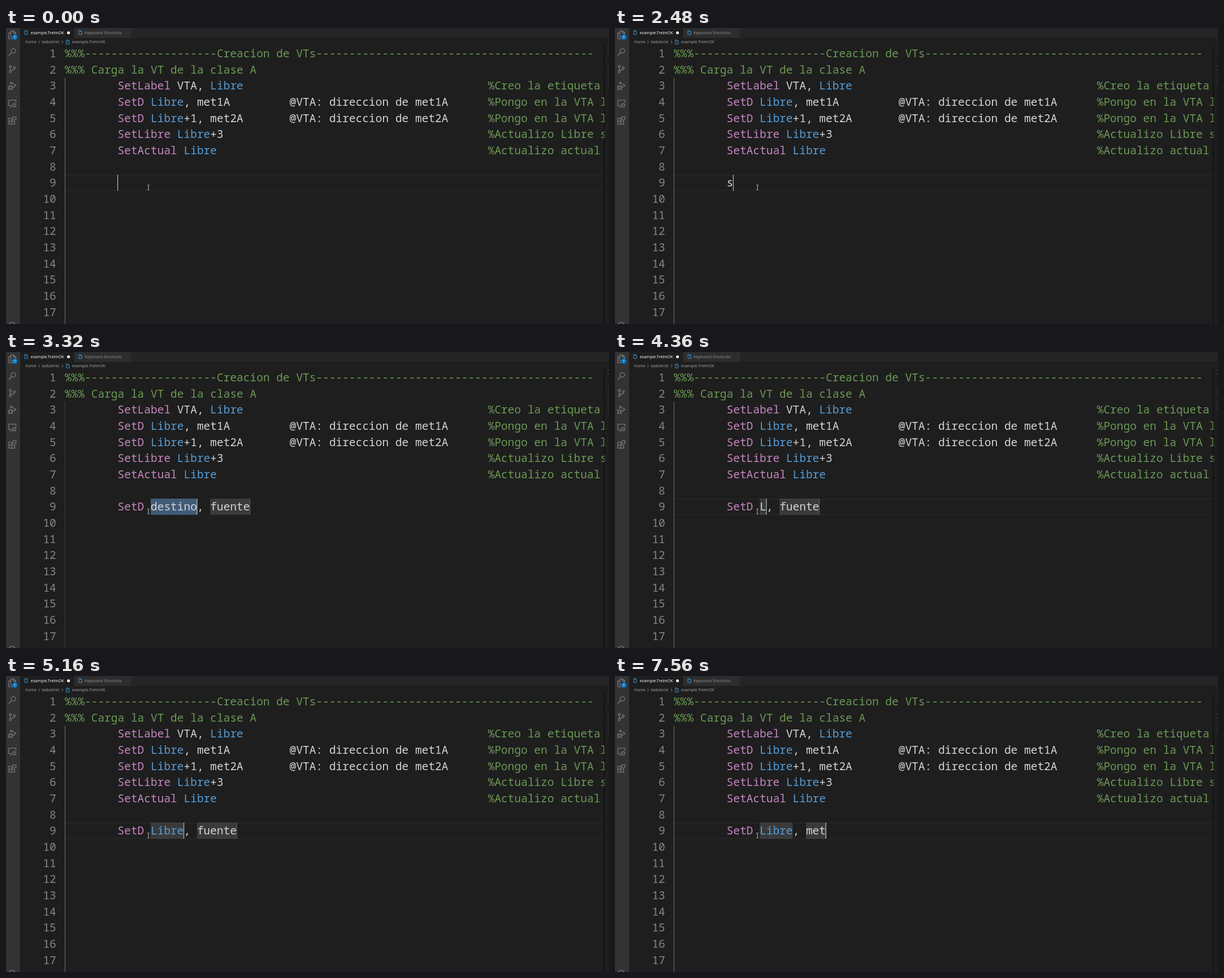
These frames come from a looping animation (1067 by 525 pixels, 8000 ms). An HTML page with a canvas:

```html
<!DOCTYPE html>
<html lang="es">
<head>
<meta charset="utf-8">
<title>Editor</title>
<style>
  html, body { margin: 0; width: 100%; height: 100%; overflow: hidden; background: #1e1e1e; }
  canvas { display: block; width: 1067px; height: 525px; }
</style>
</head>
<body>
<canvas id="stage"></canvas>
<script>
const W = 1067, H = 525, LOOP = 8000;
const LEFT = 103.9, TOP = 30.7, CHAR = 11.7, ROW = 28.67, BASE = 21.4;
const CODE = '"Noto Sans Mono", monospace';
const UI = '"Open Sans", "Noto Sans", sans-serif';
const C = {
  bg: '#1e1e1e', text: '#d4d4d4', call: '#c586c0', word: '#569cd6',
  note: '#6a9955', num: '#858585', caret: '#c8c8c8', icon: '#858585',
  file: '#3fa0e8', panel: '#252526', edge: '#454545'
};

const canvas = document.getElementById('stage');
const ctx = canvas.getContext('2d');
const dpr = window.devicePixelRatio || 1;
canvas.width = W * dpr;
canvas.height = H * dpr;
ctx.scale(dpr, dpr);

// Static code: line -> [column, colour, text] runs
const rows = {
  1: [[0, C.note, '%%%' + '-'.repeat(20) + 'Creacion de VTs' + '-'.repeat(42)]],
  2: [[0, C.note, '%%% Carga la VT de la clase A']],
  3: [[8, C.call, 'SetLabel'], [17, C.text, 'VTA,'], [22, C.word, 'Libre'],
      [64, C.note, '%Creo la etiqueta']],
  4: [[8, C.call, 'SetD'], [13, C.word, 'Libre'], [18, C.text, ', met1A'],
      [34, C.text, '@VTA: direccion de met1A'], [64, C.note, '%Pongo en la VTA l']],
  5: [[8, C.call, 'SetD'], [13, C.word, 'Libre'], [18, C.text, '+1, met2A'],
      [34, C.text, '@VTA: direccion de met2A'], [64, C.note, '%Pongo en la VTA l']],
  6: [[8, C.call, 'SetLibre'], [17, C.word, 'Libre'], [22, C.text, '+3'],
      [64, C.note, '%Actualizo Libre s']],
  7: [[8, C.call, 'SetActual'], [18, C.word, 'Libre'], [64, C.note, '%Actualizo actual']]
};

// Timelines: [start ms, value]
const caretOn = [[0, true], [480, false], [1000, true], [1440, false], [1920, true],
  [3800, false], [4240, true], [5600, false], [6160, true], [6720, false], [7160, true]];
const prefix = [[0, ''], [2480, 's'], [2760, 'sd']];
const target = [[3200, 'destino'], [4240, 'L'], [4520, 'Li'], [4760, 'Lib'], [5040, 'Libr'], [5120, 'Libre']];
const origin = [[3200, 'fuente'], [7320, 'm'], [7440, 'me'], [7560, 'met']];
const selected = [[0, ''], [3200, 'target'], [4240, ''], [6160, 'origin'], [7320, '']];
const dimmed = [[0, false], [3320, true], [4360, false], [6200, true], [7440, false]];

function valueAt(track, t) {
  let value = track[0][1];
  for (const [start, v] of track) if (t >= start) value = v;
  return value;
}

const colX = col => LEFT + col * CHAR;
const rowY = line => TOP + (line - 1) * ROW;

function rect(x, y, w, h, color) {
  ctx.fillStyle = color;
  ctx.fillRect(x, y, w, h);
}

function label(text, x, y, color, font, align = 'left') {
  ctx.font = font;
  ctx.fillStyle = color;
  ctx.textAlign = align;
  ctx.fillText(text, x, y);
}

const code = (text, x, y, color, weight = '') => label(text, x, y, color, `${weight} 19.5px ${CODE}`);
const ui = (text, x, y, color) => label(text, x, y, color, `7.2px ${UI}`);
const run = (line, col, color, text) => code(text, colX(col), rowY(line) + BASE, color);

function stroke(path, color, width = 1) {
  ctx.strokeStyle = color;
  ctx.lineWidth = width;
  ctx.stroke(new Path2D(path));
}

function frame(x, y, w, h, fill) {
  rect(x, y, w, h, fill);
  ctx.strokeStyle = C.edge;
  ctx.lineWidth = 0.8;
  ctx.strokeRect(x + 0.5, y + 0.5, w - 1, h - 1);
}

function dot(x, y, r, color) {
  ctx.fillStyle = color;
  ctx.beginPath();
  ctx.arc(x, y, r, 0, Math.PI * 2);
  ctx.fill();
}

function fileIcon(x, y) {
  stroke(`M${x} ${y}h3l2.2 2.2v4.8h-5.2zM${x + 3} ${y}v2.2h2.2`, C.file, 0.9);
}

function activityBar() {
  rect(0, 0, 25, H, '#333333');
  const icons = [
    'M8.5 5h5l3.5 3.5v7h-8.500zM13 5v4h4M8 8.500H5v10.500h8v-3',
    'M17 40.500a4 4 0 1 1-8 0a4 4 0 1 1 8 0M10.200 43.500L5 49',
    'M9.500 68a1.800 1.800 0 1 1-3.600 0a1.800 1.800 0 1 1 3.600 0M9.500 77.500a1.800 1.800 0 1 1-3.600 0a1.800 1.800 0 1 1 3.600 0M16.500 70.500a1.800 1.800 0 1 1-3.600 0a1.800 1.800 0 1 1 3.600 0M7.700 69.800v6M14.700 72.300q0 2.500-3 2.500h-2q-2 0-2 1',
    'M8.500 101v-5l9 6-6 4.200M10.500 106a2.500 3 0 1 1-5 0a2.500 3 0 1 1 5 0M4 102.500l2 1.500M4 106h1.500M4 109.500l2-1.500M12 102.500l-2 1.500M12 106h-1.500M12 109.500l-2-1.500',
    'M10 137.500H5v-9.500h12.500v4.500M7 140h3.500M17.500 137a3 3 0 1 1-6 0a3 3 0 1 1 6 0M13.500 137h2',
    'M5 160h5.200v10.500H5zM5 165.300h10.400v5.200H5zM12.300 157.500h5.200v5.200h-5.200z',
    'M17 528a6 6 0 1 1-12 0a6 6 0 1 1 12 0'
  ];
  for (const path of icons) stroke(path, C.icon, 1.1);
  dot(15.6, 16.2, 4.7, '#007acc');
  label('1', 15.6, 18.3, '#ffffff', `600 5.5px ${UI}`, 'center');
}

function tabs() {
  rect(25, 0, W - 25, 17.6, C.panel);
  rect(25, 0, 95.5, 17.6, C.bg);
  rect(121, 0, 100.5, 17.6, '#2d2d2d');
  fileIcon(33, 4.5);
  ui('example.TrelmOK', 43.8, 10.9, '#ffffff');
  dot(110.6, 8.4, 2.5, '#ffffff');
  fileIcon(129, 4.5);
  ui('Keyboard Shortcuts', 139, 10.9, '#929292');

  ui('home', 34.3, 27.4, '#a9a9a9');
  stroke('M57.300 22.500l2.300 2.400l-2.300 2.400M98.800 22.500l2.300 2.400l-2.300 2.400', '#a0a0a0', 0.8);
  ui('tadulerisi', 63.4, 27.4, '#a9a9a9');
  fileIcon(106.7, 21.3);
  ui('example.TrelmOK', 117, 27.4, '#a9a9a9');
}

function minimap() {
  const shade = ctx.createLinearGradient(1056, 0, 1060, 0);
  shade.addColorStop(0, 'rgba(0,0,0,0)');
  shade.addColorStop(1, 'rgba(0,0,0,.45)');
  rect(1056, 31, 4, H - 31, shade);
  rect(1060, 31, 7, H - 31, C.bg);
  for (const y of [31.5, 39, 67.5, 73.5, 87.5, 93.5, 99.5]) rect(1064.5, y, 2.5, 1, '#4a4a4a');
}

// Insert the snippet and mark its placeholders; returns the caret column
function snippet(t) {
  const first = valueAt(target, t), second = valueAt(origin, t), picked = valueAt(selected, t);
  const a = 13, b = a + first.length + 2, end = b + second.length;
  const y = rowY(9);
  const mark = (col, text, chosen) => {
    const w = text.length * CHAR;
    if (chosen) rect(colX(col), y, w, ROW, '#264f78');
    rect(colX(col), y, w, ROW, 'rgba(124,124,124,.3)');
  };
  mark(a, first, picked === 'target');
  mark(b, second, picked === 'origin');
  rect(colX(end) - 0.4, y, 1.1, ROW, '#626262');
  run(9, 8, C.call, 'SetD');
  run(9, a, t >= 5160 ? C.word : C.text, first);
  run(9, a + first.length, C.text, ',');
  run(9, b, C.text, second);
  return t < 6160 ? a + first.length : end;
}

function suggestions(x, items, typed, about, sample) {
  const y = 289;
  const rowsHigh = items.length * ROW;
  frame(x, y, 193, rowsHigh + 0.5, C.panel);
  items.forEach(([key, rest, hint], i) => {
    const top = y + i * ROW, base = top + 22;
    if (i === 0) rect(x + 1, top + 1, 191, ROW - 1, '#062f4a');
    ctx.strokeStyle = C.text;
    ctx.lineWidth = 0.9;
    ctx.strokeRect(x + 3.5, top + 11.5, 6.5, 7);
    const n = typed.length;
    code(key.slice(0, n), x + 14, base, '#0097fb', 'bold');
    code(key.slice(n) + rest, x + 14 + n * CHAR, base, C.text);
    code(hint, x + 120, base, i === 0 ? '#96a3ac' : '#a0a0a0');
  });

  const dx = x + 193, step = about.length * ROW;
  frame(dx, y, 193, step + sample.length * ROW + 19, C.panel);
  about.forEach((text, i) => code(text, dx + 3, y + 24 + i * ROW, '#a0a0a0'));
  sample.forEach(([head, tail], i) => {
    const base = y + 33.500 + step + i * ROW;
    code(head, dx + 3, base, C.call);
    code(tail, dx + 3 + head.length * CHAR, base, C.text);
  });
  stroke(`M${dx + 174.5} 293l4 4m0-4l-4 4`, '#c0c0c0', 0.8);
}

function popup(t) {
  if (t >= 2560 && t < 2760) {
    suggestions(209.2,
      [['sa', ', s…', 'Camb…'], ['sd', ', s…', 'Camb…'], ['si', ', s…', 'Camb…'],
       ['sl', ', s…', 'Defi…'], ['so', ', s…', 'Impr…'], ['sp', ', s…', 'Camb…']],
      's', ['Cambia el valo', 'r de actual (T', 'relmOK Syntax', 'Highlight)'],
      [['SetActual', ' dir']]);
  } else if (t >= 2760 && t < 3200) {
    suggestions(220.9, [['sd', ', s…', 'Camb…']], 'sd',
      ['Cambia los val', 'ores almacenad', 'os en la memor', 'ia D (TrelmOK', 'Syntax Highlig', 'ht)'],
      [['SetD', ' destino,'], ['', 'fuente']]);
  }
}

function pointer() {
  stroke('M250.300 278.200q1.700 0 1.700 1.200q0-1.200 1.700-1.200M252 279v7.500M250.300 287.300q1.700 0 1.700-1.200q0 1.200 1.700 1.200', '#d0d0d0', 0.9);
}

function editor(t) {
  const dim = valueAt(dimmed, t), y = rowY(9);
  if (!dim) {
    rect(104, 260.3, 955, 1.1, '#2c2c2c');
    rect(104, 287.8, 955, 1.1, '#2c2c2c');
  }
  rect(103.9, 88, 1, H - 88, dim ? '#404040' : '#707070');

  ctx.save();
  ctx.beginPath();
  ctx.rect(25, 31, 1035, H - 31);
  ctx.clip();
  for (let n = 1; n <= 17; n++) {
    label(n, 88.8, rowY(n) + BASE, C.num, `19.5px ${CODE}`, 'right');
    for (const [col, color, text] of rows[n] || []) run(n, col, color, text);
  }
  let caret;
  if (t < 3200) {
    const typed = valueAt(prefix, t);
    run(9, 8, C.text, typed);
    caret = 8 + typed.length;
  } else {
    caret = snippet(t);
  }
  if (valueAt(caretOn, t)) rect(colX(caret) - 0.4, y, 1.1, ROW, C.caret);
  ctx.restore();
}

function draw(now) {
  const t = now % LOOP;
  rect(0, 0, W, H, C.bg);
  editor(t);
  minimap();
  tabs();
  activityBar();
  popup(t);
  pointer();
}

const start = performance.now();
function tick() {
  draw(performance.now() - start);
  requestAnimationFrame(tick);
}
tick();
</script>
</body>
</html>
```
